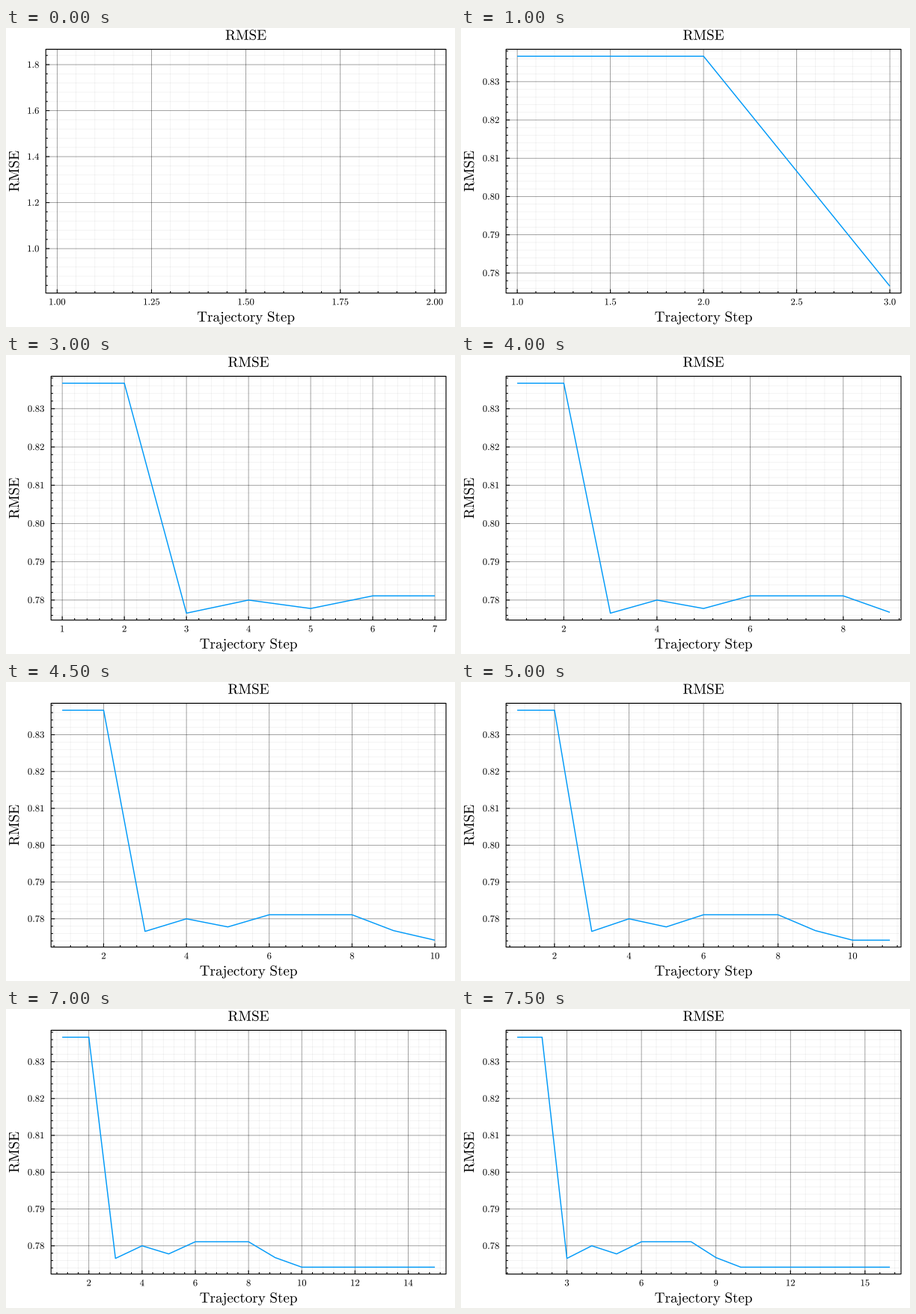
Animation, 600 px wide and 400 px high, one loop 8000 ms. Source, as a matplotlib script:

```python
import math

import matplotlib.pyplot as plt
import numpy as np
from matplotlib.animation import FuncAnimation
from matplotlib.collections import LineCollection
from matplotlib.patches import PathPatch
from matplotlib.path import Path
from matplotlib.textpath import TextPath

plt.rcParams["mathtext.fontset"] = "cm"

W, H, DPI = 600, 400, 100
RIGHT, TOP, BOTTOM = 588, 28.5, 354.6
LABEL_SIZE, TICK_SIZE = 19.1, 12.7
STEPS = 16

RMSE = [0.83666, 0.83666, 0.77658, 0.78, 0.7778,
        0.7811, 0.7811, 0.7811, 0.7768] + [0.7742] * 7

fig = plt.figure(figsize=(W / DPI, H / DPI), dpi=DPI, facecolor="white")
ax = fig.add_axes([0, 0, 1, 1])


def x_step(n):
    """Distance between major x ticks when n points are shown."""
    for last, step in ((2, 0.25), (3, 0.5), (7, 1), (11, 2), (14, 2.5), (15, 2)):
        if n <= last:
            return step
    return 3


def decimals(step):
    return next(d for d in range(4) if abs(step * 10**d - round(step * 10**d)) < 1e-9)


def ticks(lo, hi, step):
    """Yield (value, is_major) with five minor intervals per major one."""
    minor = step / 5
    for k in range(math.ceil(lo / minor), math.floor(hi / minor) + 1):
        yield k * minor, k % 5 == 0


def lines(segments, width, color="black", alpha=1.0, z=1):
    ax.add_collection(LineCollection(segments, linewidths=width * 72 / DPI, colors=color,
                                     alpha=alpha, zorder=z, snap=False, capstyle="butt"),
                      autolim=False)


def glyphs(text, size):
    return TextPath((0, 0), r"$\mathrm{%s}$" % text.replace(" ", r"\ "), size=size)


def fill(verts, codes):
    ax.add_patch(PathPatch(Path(verts, codes), facecolor="black", linewidth=0,
                           zorder=4, snap=False))


def heading(text, x, y, vertical=False):
    """Draw text centred on its baseline point."""
    path = glyphs(text, LABEL_SIZE)
    u, v = path.vertices.T
    box = path.get_extents()
    u = u - (box.x0 + box.x1) / 2
    verts = np.column_stack((x - v, y - u) if vertical else (x + u, y - v))
    fill(verts, path.codes)


def tick_label(text, x, y, align):
    """Draw a number; align is the share of its advance left of x."""
    path = glyphs(text, TICK_SIZE)
    advance = TICK_SIZE * (0.5 * len(text) - 0.222 * text.count("."))
    fill(path.vertices * [1, -1] + [x - align * advance, y], path.codes)


def draw(i):
    n = i + 1
    data = np.array(RMSE[:n])
    flat = np.ptp(data) == 0
    left = 53.2 if flat else 60.2

    x0, x1 = 1, max(n, 2)
    y0, y1 = data.min(), data.min() + 1 if flat else data.max()
    xpad, ypad = 0.03 * (x1 - x0), 0.03 * (y1 - y0)
    x0, x1, y0, y1 = x0 - xpad, x1 + xpad, y0 - ypad, y1 + ypad

    def px(x):
        return left + (RIGHT - left) * (x - x0) / (x1 - x0)

    def py(y):
        return BOTTOM - (BOTTOM - TOP) * (y - y0) / (y1 - y0)

    ax.clear()
    ax.set(xlim=(0, W), ylim=(H, 0))
    ax.axis("off")

    major, minor, marks = [], [], []
    step = x_step(n)
    for value, big in ticks(x0, x1, step):
        x = px(value)
        (major if big else minor).append([(x, TOP), (x, BOTTOM)])
        marks.append([(x, BOTTOM), (x, BOTTOM - (5 if big else 2.6))])
        if big:
            tick_label(f"{value:.{decimals(step)}f}", x, 370.4, 0.5)

    step = 0.2 if flat else 0.01
    for value, big in ticks(y0, y1, step):
        y = py(value)
        (major if big else minor).append([(left, y), (RIGHT, y)])
        marks.append([(left, y), (left + (5 if big else 2.6), y)])
        if big:
            tick_label(f"{value:.{decimals(step)}f}", left - 8.8, y + 4.1, 1)

    lines(minor, 0.8, alpha=0.06)
    lines(major, 0.75, alpha=0.48)
    lines(marks, 1.1, z=2)
    frame = [(left, TOP), (RIGHT, TOP), (RIGHT, BOTTOM), (left, BOTTOM)]
    lines([frame + frame[:2]], 1.15, z=2)
    if n > 1:
        curve = [(px(k + 1), py(v)) for k, v in enumerate(data)]
        lines([curve], 1.45, color="#009AF9", z=3)

    mid = (left + RIGHT) / 2
    heading("RMSE", mid, 15.8)
    heading("Trajectory Step", mid, 392.7)
    heading("RMSE", 17.2, (TOP + BOTTOM) / 2, vertical=True)
    return []


anim = FuncAnimation(fig, draw, frames=STEPS, init_func=lambda: [], interval=500,
                     repeat=True, repeat_delay=0, blit=False)
plt.show()
```
